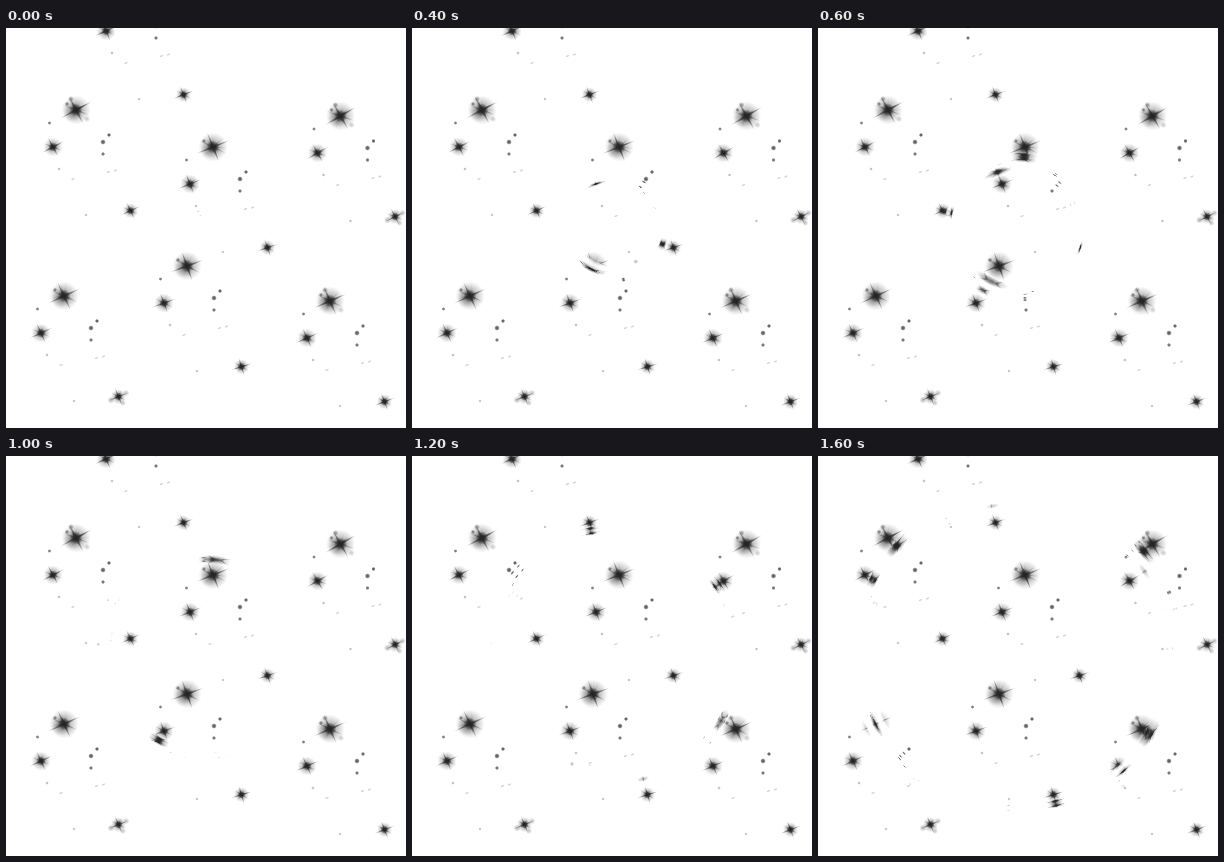
Recreate the animation shown at these times as an HTML page with a canvas. Size 400x400 px, loop 1.8 s.

```html
<!DOCTYPE html>
<html lang="en">
<head>
<meta charset="utf-8">
<title>Ripple through a star field</title>
<style>
html, body { margin: 0; width: 100%; height: 100%; overflow: hidden; background: #fff; }
canvas { display: block; width: 400px; height: 400px; }
</style>
</head>
<body>
<canvas id="sky" width="400" height="400"></canvas>
<script>
const SIZE = 400, MID = 200, STEP = 200, COUNT = 9;
const START = 10, SPEED = 18.5;   // ring radius at step 0, growth per step
const BAND = 10, PUSH = 12.5;     // half width of the ring, strongest shift

const ctx = document.getElementById('sky').getContext('2d', { willReadFrequently: true });

let seed = 7;
function rand() {
  seed = (seed * 16807) % 2147483647;
  return seed / 2147483647;
}

const ink = a => `rgba(36,36,36,${a})`;

function blob(x, y, r, a, soft = 0.35) {
  const g = ctx.createRadialGradient(x, y, 0, x, y, r);
  g.addColorStop(0, ink(a));
  g.addColorStop(soft, ink(a * 0.8));
  g.addColorStop(1, ink(0));
  ctx.fillStyle = g;
  ctx.fillRect(x - r, y - r, 2 * r, 2 * r);
}

function spike(x, y, angle, len, wide, a) {
  ctx.save();
  ctx.translate(x, y);
  ctx.rotate(angle);
  const g = ctx.createLinearGradient(0, 0, len, 0);
  g.addColorStop(0, ink(a));
  g.addColorStop(0.4, ink(a * 0.75));
  g.addColorStop(1, ink(a * 0.2));
  ctx.fillStyle = g;
  ctx.beginPath();
  ctx.moveTo(0, -wide);
  ctx.lineTo(len, 0);
  ctx.lineTo(0, wide);
  ctx.fill();
  ctx.restore();
}

function star(x, y, core, halo, reach, angle) {
  const g = ctx.createRadialGradient(x, y, 0, x, y, halo);
  g.addColorStop(0, ink(0.55));
  g.addColorStop(0.3, ink(0.36));
  g.addColorStop(0.65, ink(0.17));
  g.addColorStop(1, ink(0));
  ctx.fillStyle = g;
  ctx.fillRect(x - halo, y - halo, 2 * halo, 2 * halo);
  for (let i = 0; i < 16; i++) {
    spike(x, y, rand() * 2 * Math.PI, halo * (0.7 + rand() * 0.4), 0.8, 0.2);
  }
  for (let i = 0; i < 4; i++) {
    spike(x, y, angle + i * Math.PI / 2, reach * (i % 2 ? 0.88 : 1), core * 0.36, 0.75);
  }
  for (let i = 0; i < 2; i++) {
    spike(x, y, angle + 0.85 + i * Math.PI, reach * 0.85, core * 0.3, 0.45);
  }
  blob(x, y, core * 1.6, 0.9, 0.45);
}

function streak(x, y) {
  ctx.fillStyle = ink(0.2);
  ctx.beginPath();
  ctx.ellipse(x, y, 1.8, 0.7, -0.4, 0, 2 * Math.PI);
  ctx.fill();
}

// One cluster; the field repeats it with a slightly different tilt.
function cluster([x, y, tilt, clumps, smudges]) {
  const angle = tilt * Math.PI / 180;
  star(x, y, 4, 14.5, 18, angle);
  blob(x - 3, y + 2, 9.5, 0.3);
  blob(x - 9, y - 6, 2.3, 0.6);
  if (clumps) {
    blob(x - 5, y - 11, 3, 0.45);
    blob(x + 11, y + 9, 3.2, 0.22);
  }
  star(x - 23, y + 37, 2.9, 9.5, 12.5, angle);
  star(x + 54.5, y + 100.7, 2.5, 7.5, 11, angle + 0.05);
  if (smudges) {
    blob(x + 62, y + 97, 3.4, 0.25);
    blob(x + 47, y + 104, 3.6, 0.3);
    blob(x + 59, y + 107, 3, 0.25);
  }
  blob(x + 33, y + 25, 2.1, 0.8, 0.5);
  blob(x + 27, y + 32, 2.8, 0.78, 0.5);
  blob(x + 27, y + 44, 2.1, 0.7, 0.5);
  blob(x - 26.5, y + 13, 1.9, 0.65, 0.5);
  blob(x - 17, y + 59, 1.8, 0.35);
  blob(x + 10, y + 105, 1.7, 0.35);
  streak(x + 39.5, y + 60.5);
  streak(x + 32.5, y + 62);
  streak(x - 3, y + 69);
}

const field = [
  [70, 82, -28, 1, 0],
  [207, 119, -22, 0, 0],
  [181, 238, -20, 0, 0],
  [334.5, 88, -30, 1, 1],
  [58, 268, -25, 0, 1],
  [324, 273, -24, 1, 0],
  [123, -34, -24, 0, 0]
];

ctx.fillStyle = '#fff';
ctx.fillRect(0, 0, SIZE, SIZE);
field.forEach(cluster);
const still = ctx.getImageData(0, 0, SIZE, SIZE);
const shade = still.data;

const at = (x, y) =>
  x < 0 || y < 0 || x >= SIZE || y >= SIZE ? 255 : shade[(y * SIZE + x) * 4];

function sample(x, y) {
  const i = Math.floor(x), j = Math.floor(y), u = x - i, v = y - j;
  const top = at(i, j) * (1 - u) + at(i + 1, j) * u;
  const low = at(i, j + 1) * (1 - u) + at(i + 1, j + 1) * u;
  return top * (1 - v) + low * v;
}

// Shifts pixels inside the ring along the radius by one sine wave.
function ripple(step) {
  const radius = START + SPEED * step;
  const out = new ImageData(new Uint8ClampedArray(shade), SIZE, SIZE);
  for (let y = 0; y < SIZE; y++) {
    for (let x = 0; x < SIZE; x++) {
      const dx = x + 0.5 - MID, dy = y + 0.5 - MID;
      const r = Math.hypot(dx, dy), off = r - radius;
      if (Math.abs(off) >= BAND) continue;
      const k = 1 + PUSH * Math.sin(Math.PI * off / BAND) / r;
      const p = (y * SIZE + x) * 4;
      const c = sample(MID + dx * k - 0.5, MID + dy * k - 0.5);
      out.data[p] = out.data[p + 1] = out.data[p + 2] = c;
    }
  }
  return out;
}

let shown = -1;
const begin = performance.now();

function draw(now) {
  const step = Math.floor(Math.max(0, now - begin) / STEP) % COUNT;
  if (step !== shown) {
    ctx.putImageData(ripple(step), 0, 0);
    shown = step;
  }
  requestAnimationFrame(draw);
}
draw(begin);
</script>
</body>
</html>
```
